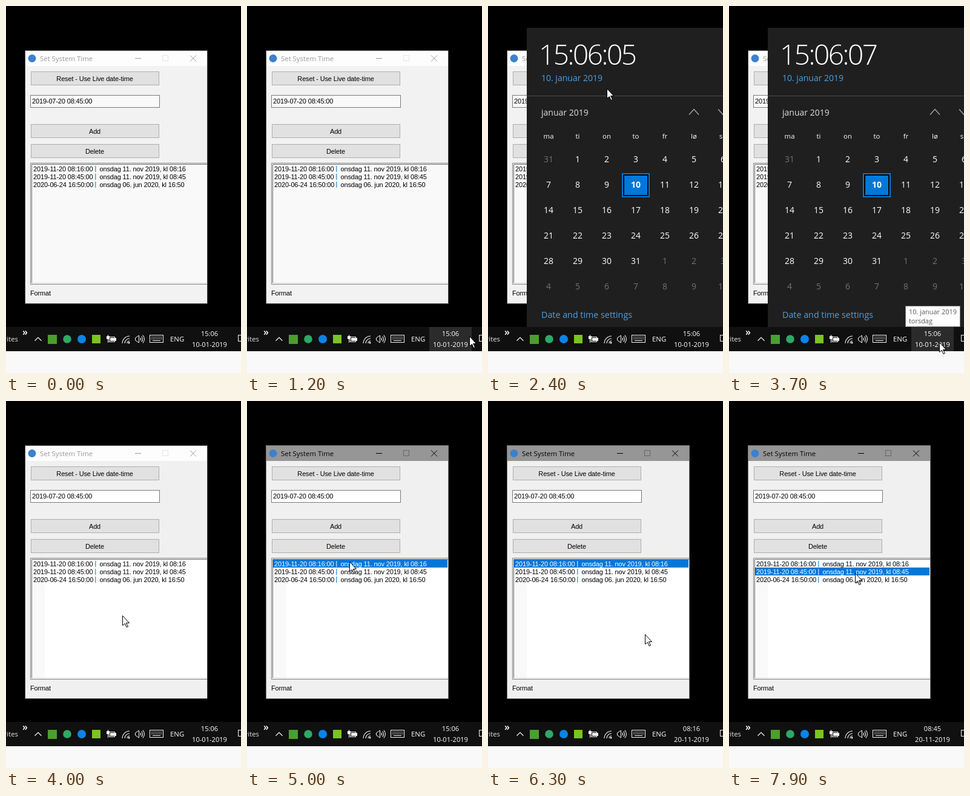
Recreate the animation shown at these times as an HTML page with a canvas. Size 388 px wide and 606 px high, loop 8 s.

```html
<!DOCTYPE html>
<html lang="en">
<head>
<meta charset="utf-8">
<title>Set System Time</title>
<style>
html, body { margin: 0; width: 100%; height: 100%; overflow: hidden; background: #000; }
canvas { display: block; }
</style>
</head>
<body>
<canvas id="stage" width="388" height="606"></canvas>
<script>
const W = 388, H = 606, LOOP = 8000, STEP = 100;
const UI = '"Open Sans", "Noto Sans", sans-serif';
const FORM = '"Liberation Sans", Arial, sans-serif';
const BLUE = '#0078d7', INK = '#f4f4f4';

const stage = document.getElementById('stage').getContext('2d');
const layer = document.createElement('canvas');
layer.width = W;
layer.height = H;
const panel = layer.getContext('2d');
let g = stage;

// Pointer stops; bow bends the way there sideways
const ENTRY = { x: 384, y: 28 };
const moves = [
  { from: 200, to: 1000, x: 346, y: 549 },
  { from: 1000, to: 1500, x: 341, y: 544, bow: 32 },
  { from: 1900, to: 2400, x: 196, y: 136 },
  { from: 2600, to: 3500, x: 347, y: 555, bow: -85 },
  { from: 3800, to: 4200, x: 159, y: 311 },
  { from: 4300, to: 4800, x: 169, y: 265 },
  { from: 5300, to: 5900, x: 324, y: 526 },
  { from: 6100, to: 6800, x: 209, y: 278 },
  { from: 7500, to: 7600, x: 208, y: 283 },
  { from: 7800, to: 7900, x: 208, y: 284 }
];

const entries = [
  ['2019-11-20 08:16:00', 'onsdag 11. nov 2019, kl 08:16'],
  ['2019-11-20 08:45:00', 'onsdag 11. nov 2019, kl 08:45'],
  ['2020-06-24 16:50:00', 'onsdag 06. jun 2020, kl 16:50']
];

const clamp = v => Math.min(1, Math.max(0, v));
const easeOut = k => 1 - Math.pow(1 - k, 2.5);

function pointer(t) {
  if (t < moves[0].from) return null;
  let { x, y } = ENTRY;
  for (const m of moves) {
    const k = easeOut(clamp((t - m.from) / (m.to - m.from)));
    x += (m.x - x) * k + (m.bow || 0) * Math.sin(Math.PI * k);
    y += (m.y - y) * k;
  }
  return { x: Math.round(x), y: Math.round(y) };
}

function rect(x, y, w, h, color) {
  g.fillStyle = color;
  g.fillRect(x, y, w, h);
}

function frame(x, y, w, h, color) {
  g.strokeStyle = color;
  g.lineWidth = 1;
  g.strokeRect(x + 0.5, y + 0.5, w - 1, h - 1);
}

function box(x, y, w, h, fill, edge) {
  rect(x, y, w, h, fill);
  frame(x, y, w, h, edge);
}

function text(s, x, y, size, color, align = 'left', family = UI, weight = 400) {
  g.font = `${weight} ${size}px ${family}`;
  g.fillStyle = color;
  g.textAlign = align;
  g.fillText(s, x, y);
}

function label(s, x, y, color = '#000', align = 'left') {
  g.letterSpacing = '-0.15px';
  text(s, x, y, 11, color, align, FORM);
  g.letterSpacing = '0px';
}

function line(points, color, width = 1) {
  g.beginPath();
  points.forEach(([x, y]) => g.lineTo(x, y));
  g.strokeStyle = color;
  g.lineWidth = width;
  g.stroke();
}

// Negative h points up
function chevron(x, y, w, h, color) {
  line([[x - w, y - h / 2], [x, y + h / 2], [x + w, y - h / 2]], color, 1.2);
}

function disc(x, y, r, color) {
  g.beginPath();
  g.arc(x, y, r, 0, 7);
  g.fillStyle = color;
  g.fill();
}

function waves(x, y, gap, from, to) {
  g.strokeStyle = INK;
  g.lineWidth = 1.1;
  for (let i = 1; i <= 3; i++) {
    g.beginPath();
    g.arc(x, y, i * gap, from, to);
    g.stroke();
  }
}

function button(s, y) {
  box(41, y, 212, 23, '#e1e1e1', '#adadad');
  label(s, 146.5, y + 16, '#000', 'center');
}

function titleBar(active) {
  const ink = active ? '#000' : '#999';
  box(31, 73, 302, 419, active ? '#969696' : '#fdfdfd', active ? '#707070' : '#444');
  disc(43, 86.5, 6.5, '#3c80cf');
  text('Set System Time', 56, 90.5, 11.4, ink);
  line([[213, 86.5], [223, 86.5]], ink);
  frame(258, 81, 10, 10, active ? '#666' : '#e6e6e6');
  line([[304, 81.5], [314, 91.5]], ink);
  line([[304, 91.5], [314, 81.5]], ink);
}

function listBox(selected, fresh) {
  rect(40, 259, 292, 201, '#f9f9f9');
  if (fresh) rect(64, 259, 268, 201, '#fff');
  line([[332, 259.5], [40.5, 259.5], [40.5, 459.5], [332, 459.5]], '#828282');
  line([[332, 261.5], [42.5, 261.5], [42.5, 457.5]], '#696969');
  line([[42.5, 457.5], [332, 457.5]], '#d8d8d8');
  entries.forEach(([stamp, words], i) => {
    const y = 262 + 13 * i, on = i === selected;
    const ink = on ? '#fff' : '#000';
    if (on) rect(43, y, 288, 13, BLUE);
    label(stamp, 45, y + 11, ink);
    rect(147, y + 2, 1.5, 10, on ? '#9fd0ff' : '#4a9fe0');
    label(words, 154.5, y + 11, ink);
  });
}

function appWindow(t) {
  const fresh = t >= 4000;
  titleBar(t >= 5000);
  rect(32, 99, 300, 392, fresh ? '#f0f0f0' : '#f2f2f2');
  button('Reset - Use Live date-time', 108);
  box(40, 147, 214, 21, fresh ? '#fff' : '#f9f9f9', '#7a7a7a');
  label('2019-07-20 08:45:00', 43, 161);
  button('Add', 195);
  button('Delete', 228);
  listBox(t < 5000 ? -1 : t < 7000 ? 0 : 1, fresh);
  label('Format', 40, 478);
}

function calendar(t) {
  const seconds = t < 2700 ? 5 : t < 3600 ? 6 : 7;
  rect(64, 36, 324, 560, '#1f1f1f');
  g.letterSpacing = '-2.5px';
  text('15:06:0' + seconds, 84, 97, 46, '#fff', 'left', UI, 300);
  g.letterSpacing = '0px';
  text('10. januar 2019', 88, 123.5, 14, '#4ca0e4');
  rect(64, 148, 324, 1, '#4c4c4c');
  text('januar 2019', 88, 180.5, 14, '#dedede');
  chevron(340, 175, 8, -9, '#b0b0b0');
  chevron(388, 175, 8, 9, '#b0b0b0');

  const column = i => 100 + 48 * (i % 7);
  'ma ti on to fr lø sø'.split(' ').forEach((d, i) =>
    text(d, column(i), 219, 11.4, '#fff', 'center', UI, 500));

  [BLUE, '#000', BLUE].forEach((color, i) =>
    rect(221 + 2 * i, 276 + 2 * i, 46 - 4 * i, 40 - 4 * i, color));
  for (let i = 0; i < 42; i++) {
    const day = (i + 30) % 31 + 1;
    text(day, column(i), 258 + 42 * Math.floor(i / 7), 14,
      day === i ? '#fff' : '#737373', 'center', UI, i === 10 ? 700 : 400);
  }
  text('Date and time settings', 88, 514.5, 14.3, '#4ca0e4');
}

function flyout(t) {
  if (t < 1800 || t >= 4000) return;
  const closing = t >= 3900;
  const drop = closing ? 20 : Math.round(30 * Math.pow(0.4, (t - 1900) / STEP));
  g = panel;
  panel.clearRect(0, 0, W, H);
  calendar(t);
  g = stage;
  g.globalAlpha = closing ? 0.5 : clamp(0.35 * ((t - 1800) / STEP + 1));
  g.drawImage(layer, 0, drop);
  g.globalAlpha = 1;
}

function trayIcons() {
  chevron(53, 550, 5.5, -5.5, INK);
  rect(69, 543, 15, 15, '#4aa02c');
  disc(101, 550, 6.8, '#2fa866');
  disc(125, 550, 7, '#0a84e8');
  rect(142, 543, 14, 14, '#7ac51e');

  // Battery with plug
  frame(170, 546, 10, 9, INK);
  rect(172, 548, 10, 5, INK);
  rect(166, 545, 5, 5, INK);
  line([[168.5, 543], [168.5, 556]], INK);

  // Wireless, speaker
  waves(204, 557, 4, Math.PI, 1.5 * Math.PI);
  disc(203, 556, 1.5, INK);
  line([[219.5, 544], [213.5, 548], [213.5, 552], [219.5, 556], [219.5, 544]], INK);
  waves(219.5, 550, 3, -0.8, 0.8);

  // Keyboard
  frame(237, 543, 23, 13, INK);
  for (let i = 0; i < 16; i++)
    rect(240 + (i % 8) * 2.3, i < 8 ? 546 : 549, 1.2, 1.2, INK);
  rect(242, 552, 13, 1, INK);

  frame(383, 543, 14, 11, INK);
}

function taskbar(t, pos) {
  rect(0, 530, W, 40, '#101010');
  rect(0, 570, W, 36, '#f9f9f9');
  if (pos && pos.x >= 301 && pos.x < 371 && pos.y >= 530) rect(301, 530, 70, 40, '#2b2b2b');
  text('rites', 20, 554, 11.4, '#e4e4e4', 'right');
  text('»', 27, 544, 16, '#fff', 'left', UI, 600);
  trayIcons();
  text('ENG', 271, 554, 11.4, '#fff');
  const time = t < 5300 ? '15:06' : t < 7300 ? '08:16' : '08:45';
  text(time, 336, 545, 11.1, '#fff', 'center');
  text(t < 5300 ? '10-01-2019' : '20-11-2019', 336, 563, 11.1, '#fff', 'center');
}

function tooltip(t) {
  if (t < 3600 || t >= 3900) return;
  box(291, 495, 91, 35, '#fff', '#767676');
  text('10. januar 2019', 297, 509, 10.95, '#575757');
  text('torsdag', 297, 524, 10.95, '#575757');
}

function arrow({ x, y }) {
  g.save();
  g.translate(x + 0.5, y + 0.5);
  g.beginPath();
  [[0, 0], [0, 16], [4, 13], [6.5, 19], [9, 18], [6, 12], [11, 12]]
    .forEach(([dx, dy]) => g.lineTo(dx, dy));
  g.closePath();
  g.fillStyle = '#fff';
  g.fill();
  g.strokeStyle = '#000';
  g.lineWidth = 1;
  g.stroke();
  g.restore();
}

function draw(now) {
  const t = Math.floor((now % LOOP) / STEP) * STEP;
  const pos = pointer(t);
  rect(0, 0, W, H, '#000');
  appWindow(t);
  flyout(t);
  taskbar(t, pos);
  tooltip(t);
  if (pos) arrow(pos);
  requestAnimationFrame(draw);
}
requestAnimationFrame(draw);
</script>
</body>
</html>
```
